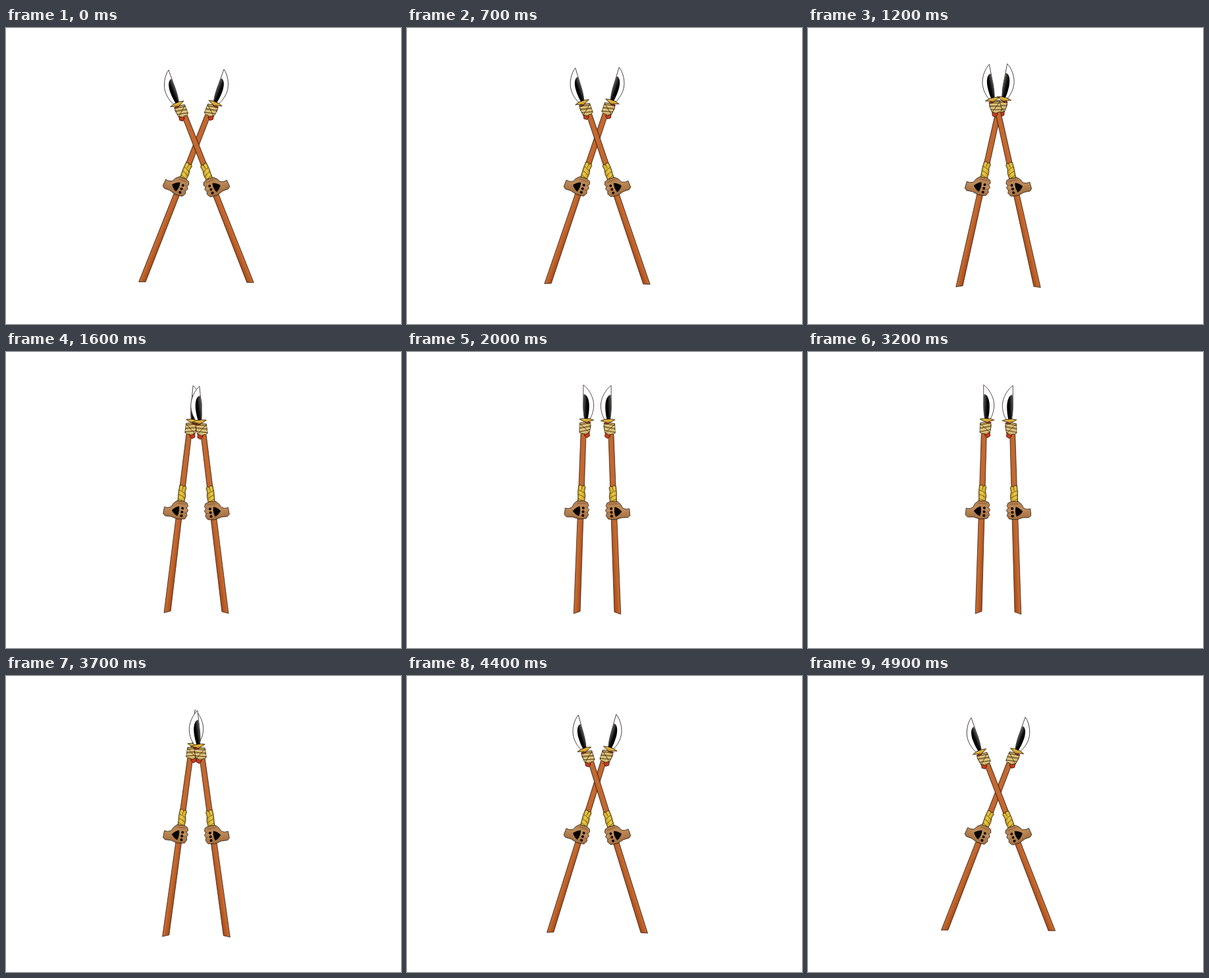
Write an HTML page with a canvas that moves like this. It is 600 px wide and 450 px high and loops after 5 s.

```html
<!DOCTYPE html>
<html lang="en">
<head>
<meta charset="utf-8">
<title>Crossed spears</title>
<style>
  html, body { margin: 0; width: 100%; height: 100%; overflow: hidden; background: #fff; }
  canvas { display: block; width: 600px; height: 450px; }
</style>
</head>
<body>
<canvas id="stage" width="600" height="450"></canvas>
<script>
const ctx = document.getElementById('stage').getContext('2d');
const LOOP = 5000, STEP = 100, DELAY = 118;
const PIVOT = { x: 262, y: 241 };
const SWING = 11.4 * Math.PI / 180;
const INK = '#160c06';

function across(x0, x1, ...colors) {
  const g = ctx.createLinearGradient(x0, 0, x1, 0);
  colors.forEach((c, i) => g.addColorStop(i / (colors.length - 1), c));
  return g;
}

function shape(d, fill, line = INK, width = 0.8) {
  const path = new Path2D(d);
  if (fill) {
    ctx.fillStyle = fill;
    ctx.fill(path);
  }
  if (line) {
    ctx.strokeStyle = line;
    ctx.lineWidth = width;
    ctx.stroke(path);
  }
}

function drawPole() {
  const wood = across(257, 272, '#b05a24', '#c46a32', '#c2672e', '#b4561f', '#a34a1a');
  shape('M257.3 122 L265.3 122 L271.8 394 L262.2 398 L259.5 240 Z', wood, INK, 0.65);
}

function drawBlade() {
  shape('M257 50 C264 54 274 67 274.5 80 C274.8 89 272.5 96 270 101 L261.5 101 C259.5 93 258.3 84 258.2 74 Z', '#fff', INK, 0.7);
  shape('M258.3 64 C263.5 64 267.4 72 267.8 83 C268 90 267.5 96 266.5 101 L261.5 101 C259 92 258 78 258.3 64 Z',
    across(258, 267, '#55584f', '#30322e', '#050505', '#000'), null);
}

function drawCollar() {
  shape('M264 106 L271 106 L271.5 113 L270 122 L271 127 L267 130 L263 127 Z', '#cf3a1c', INK, 0.7);
  shape('M254.8 108 L262 106.5 L271.5 110 L270.5 121 L265 125 L255 122.5 Z', '#c9ab62', INK, 0.7);
  shape('M255 113 L271 109 M255 119 L271 115 M257 123 L270.5 119', null, '#e6d08c', 1.4);
  shape('M255 111 L271 107 M255 116 L271 112 M255 121.5 L271 117.5 M255 109 L270.5 122', null, '#4a3518', 0.8);
  shape('M254 102.3 L260 100.8 L270 100.8 L276 102.6 L270 104.4 L265 106.8 L259 104.8 Z', '#d6a02a', INK, 0.7);
  shape('M259 102.3 L271 102.3', null, '#f2d266', 0.8);
}

function drawGrip() {
  shape('M258.5 203 L262 202 L264 204 L267 202.5 L269 205 L268 211 L269.5 218 L268.5 230 L259 230 L258.6 221 L258 212 Z',
    across(258, 270, '#c9a024', '#eacb48', '#d9b32e', '#b88a1e'), INK, 0.7);
  for (let y = 210; y < 228; y += 6.5) {
    shape(`M258.5 ${y} Q264 ${y + 1} 268.5 ${y + 4.5}`, null, '#5b430b', 0.8);
  }
  shape('M264 204 L263 210', null, '#5b430b', 0.8);
}

function drawHand() {
  const skin = ctx.createLinearGradient(0, 226, 0, 254);
  skin.addColorStop(0, '#b07c4c');
  skin.addColorStop(0.45, '#c08c5a');
  skin.addColorStop(1, '#a06c3e');
  shape('M240 238.5 Q245 240 250 237 L253 231 L257.5 226.6 L268 226 L273.5 228 L275.5 232.5 L273.6 235.5 ' +
    'L276.5 239 L274.5 243 L276 247 L273 252.5 L262 254 L252 251.5 L243 251.8 L239.6 249 Z', skin, INK, 0.7);
  shape('M258 230 L271 230 M271 235.5 L274 235.5 M271 243 L274.5 243', null, '#7d502b', 0.7);
  shape('M251.8 242 Q257 235.5 262 234.4 Q264.4 241.5 261.4 249.4 Q256 247.6 251.8 242 Z', '#060402', null);
  ctx.fillStyle = '#060402';
  for (const y of [236.8, 242.5, 248.3]) {
    ctx.beginPath();
    ctx.arc(267.6, y, 2, 0, Math.PI * 2);
    ctx.fill();
  }
}

function drawSpear(angle, mirrored) {
  ctx.save();
  if (mirrored) {
    ctx.translate(578, 1);
    ctx.scale(-1, 1);
  }
  ctx.translate(PIVOT.x, PIVOT.y);
  ctx.rotate(angle);
  ctx.translate(-PIVOT.x, -PIVOT.y);
  drawPole();
  drawBlade();
  drawCollar();
  drawGrip();
  drawHand();
  ctx.restore();
}

function render(now) {
  const t = Math.floor((now % LOOP) / STEP) * STEP;
  const angle = SWING * (1 + Math.cos(2 * Math.PI * (t - DELAY) / LOOP));
  ctx.fillStyle = '#fff';
  ctx.fillRect(0, 0, 600, 450);
  ctx.lineJoin = 'round';
  drawSpear(angle, false);
  drawSpear(angle, true);
}

let start;
function tick(now) {
  start ??= now;
  render(now - start);
  requestAnimationFrame(tick);
}
render(0);
requestAnimationFrame(tick);
</script>
</body>
</html>
```
